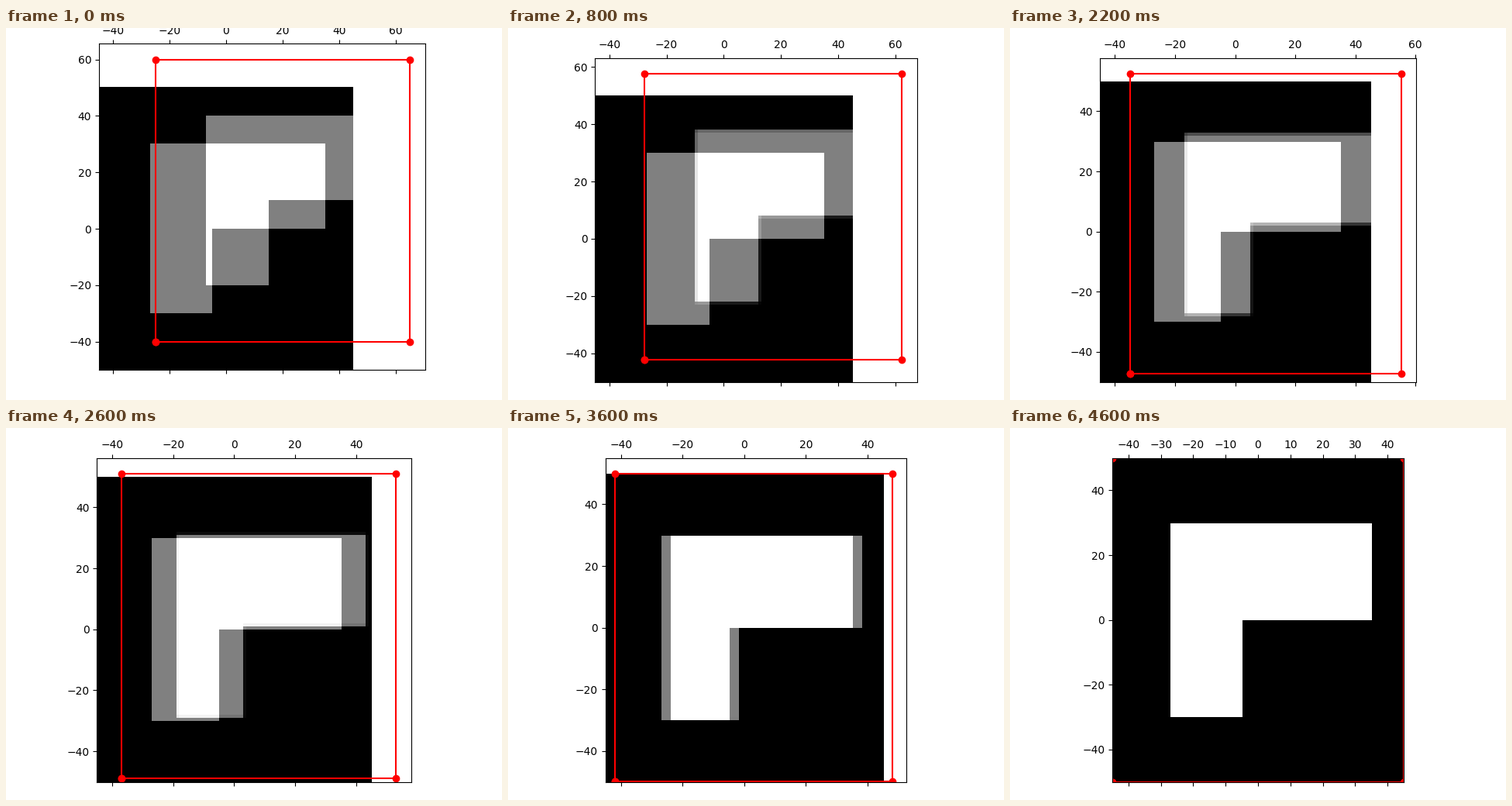
Write a matplotlib script that moves like this. It is 640x480 px and loops after 6.8 s.

```python
import numpy as np
import matplotlib.pyplot as plt
from matplotlib.animation import FuncAnimation
from matplotlib.ticker import MaxNLocator

W, H, DPI = 640, 480, 100
HALF_W, HALF_H = 45, 50
STEP_MS, LOOP_MS = 200, 6800
LAST_STEP = 23

# (step, offset) knots of the registration path
PATH_X = [(1, 20), (4, 17.2), (7, 14.31), (11, 10.17), (15, 6),
          (20, 1), (21, 0.1), (22, 0.02), (23, 0)]
PATH_Y = [(1, 10), (4, 7.8), (7, 5.6), (11, 2.6), (14, 0.35),
          (15, 0.01), (20, 0.01), (21, 0)]


def along(path, step):
    steps, values = zip(*path)
    return float(np.interp(step, steps, values))


def coverage(lo, hi, half):
    """Share of each unit cell in [-half, half] that lies inside [lo, hi]."""
    left = np.arange(-half, half)
    return np.clip(np.minimum(hi, left + 1) - np.maximum(lo, left), 0, 1)


def shape(tx=0.0, ty=0.0):
    def box(x0, x1, y0, y1):
        return np.outer(coverage(y0 + ty, y1 + ty, HALF_H),
                        coverage(x0 + tx, x1 + tx, HALF_W))
    return box(-27, 35, 0, 30) + box(-27, -5, -30, 0)


def upper_limit(half, shift):
    """Upper axis limit: 5 % margin unless the outline ends on the image edge."""
    if shift < 1e-6:
        return half
    return half + shift + 0.05 * (2 * half + shift)


def place_axes(step, xmax, ymax):
    """Fit equal-aspect axes into the layout, in pixels from the top."""
    center, top, bottom = (330.4, 20.49, 441.28) if step == 0 else (320, 38.72, 456.51)
    height = bottom - top
    width = height * (xmax + HALF_W) / (ymax + HALF_H)
    ax.set_position([(center - width / 2) / W, 1 - bottom / H, width / W, height / H])
    ax.set_xlim(-HALF_W, xmax)
    ax.set_ylim(-HALF_H, ymax)


fixed = shape()
corner_x = HALF_W * np.array([-1, 1, 1, -1, -1])
corner_y = HALF_H * np.array([-1, -1, 1, 1, -1])

fig = plt.figure(figsize=(W / DPI, H / DPI), dpi=DPI)
ax = fig.add_axes([0.1, 0.1, 0.8, 0.8])
image = ax.imshow(fixed, cmap="gray", vmin=0, vmax=1, origin="lower",
                  interpolation="nearest", aspect="auto",
                  extent=(-HALF_W, HALF_W, -HALF_H, HALF_H))
outline, = ax.plot(corner_x, corner_y, "ro-")
ax.xaxis.tick_top()
ax.xaxis.set_ticks_position("both")
ax.tick_params(axis="x", labeltop=True, labelbottom=False)
for axis in (ax.xaxis, ax.yaxis):
    axis.set_major_locator(MaxNLocator(nbins=9, steps=[1, 2, 5, 10], integer=True))


def draw(frame):
    step = min(frame, LAST_STEP)
    tx, ty = along(PATH_X, step), along(PATH_Y, step)
    image.set_data((fixed + shape(tx, ty)) / 2)
    outline.set_data(corner_x + tx, corner_y + ty)
    place_axes(step, upper_limit(HALF_W, tx), upper_limit(HALF_H, ty))
    return image, outline


anim = FuncAnimation(fig, draw, frames=LOOP_MS // STEP_MS, interval=STEP_MS,
                     init_func=lambda: draw(0), repeat=True, repeat_delay=0)
plt.show()
```
